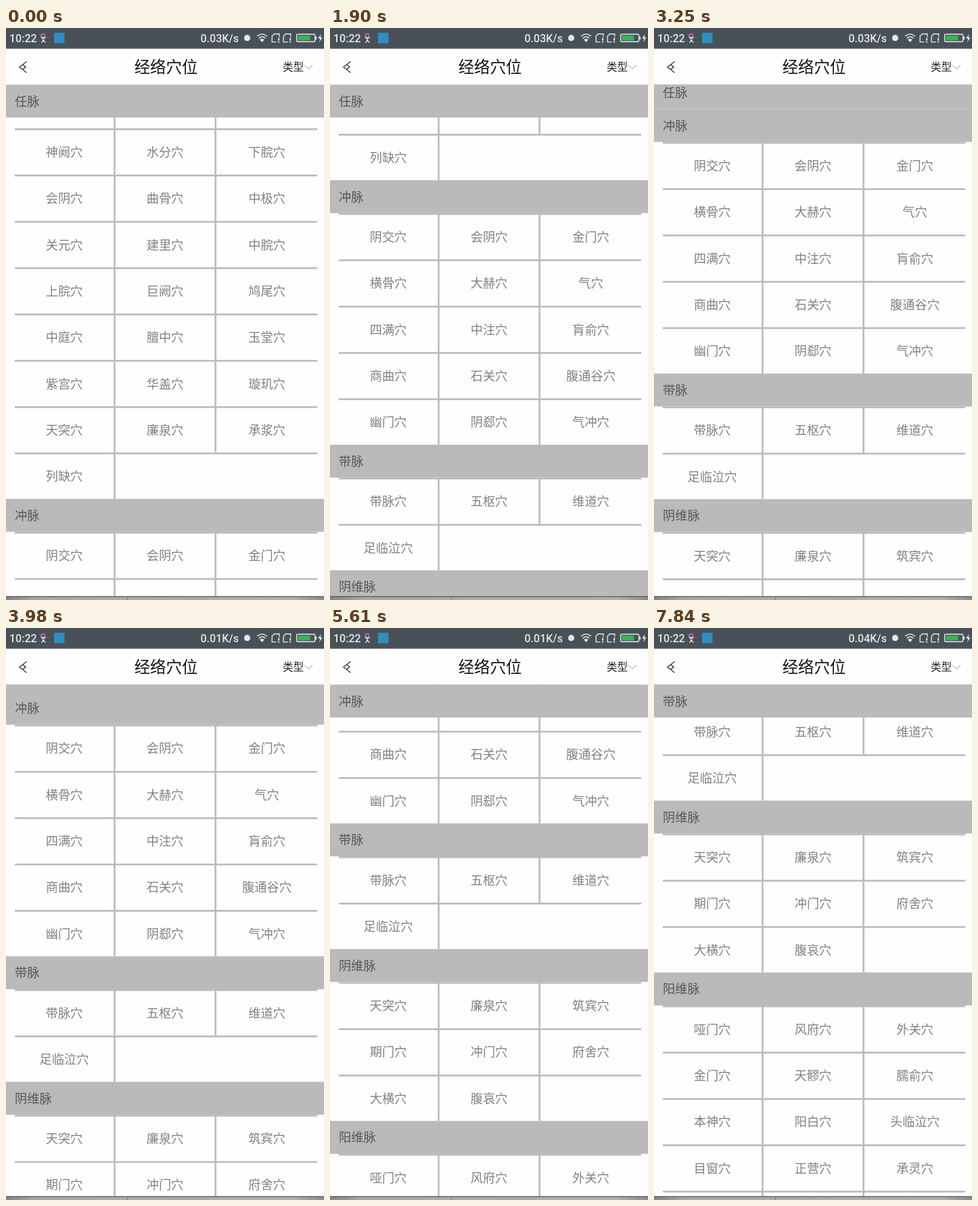
Animation, 470 px wide and 844 px high, one loop 7990 ms. Source, as an HTML page:

```html
<!DOCTYPE html>
<html lang="zh-CN">
<head>
<meta charset="utf-8">
<title>经络穴位</title>
<style>
  html, body { margin: 0; width: 100%; height: 100%; overflow: hidden; background: #fefefe; }
  svg { display: block; width: 100%; height: 100%; }
  text { font-family: "Noto Sans CJK SC", "Noto Sans CJK", sans-serif; font-weight: 300; }
  .cell { font-size: 18.2px; fill: #808080; text-anchor: middle; }
  .head { font-size: 18.2px; fill: #555; }
  .band, .rule { fill: #bababa; }
  .status { font: 500 16px Roboto, sans-serif; fill: #e3e6e8; }
  .icon { fill: none; stroke: #e3e6e8; stroke-width: 1.4; }
  .lit { fill: #e3e6e8; }
</style>
</head>
<body>
<svg viewBox="0 0 470 844" preserveAspectRatio="none">
  <defs>
    <linearGradient id="edge">
      <stop offset="0" stop-color="#858585"/>
      <stop offset=".1" stop-color="#a8a8a8"/>
      <stop offset=".9" stop-color="#b0b0b0"/>
      <stop offset="1" stop-color="#8c8c8c"/>
    </linearGradient>
  </defs>
  <rect width="470" height="844" fill="#fefefe"/>
  <g id="list"></g>
  <g id="pin">
    <rect class="band" y="83.5" width="470" height="48.6"/>
    <text class="head" id="pinName" x="13" y="114.6"></text>
  </g>

  <!-- title bar -->
  <rect y="30" width="470" height="53.2" fill="#fefefe"/>
  <path d="M30.5 49.5L20 57.5L30.5 66M24.5 53.8L29 57.6L24.5 61.5" fill="none" stroke="#444" stroke-width="1.5"/>
  <text x="236.5" y="66" font-size="23.4" fill="#111" text-anchor="middle">经络穴位</text>
  <text x="409" y="63.2" font-size="15.6" fill="#222">类型</text>
  <path d="M441 54.5L447 60.5L453 54.5" fill="none" stroke="#999"/>

  <!-- status bar -->
  <rect width="470" height="30.6" fill="#495158"/>
  <text class="status" x="5" y="21">10:22</text>
  <circle cx="54.7" cy="11.2" r="2.6" fill="none" stroke="#c56fc4" stroke-width="1.5"/>
  <path class="icon" stroke-width="1" d="M51.5 13.5L55 15.5L59 13.8M55 14V18L52.5 22M55 18L58.5 21.5"/>
  <rect x="71" y="7" width="15.5" height="15.5" fill="#2f8fc0"/>
  <text class="status" id="speed" x="287.5" y="21"></text>
  <circle class="lit" cx="356.5" cy="14.7" r="4.6"/>
  <g class="icon" stroke-width="2">
    <path d="M371 12.2Q378.5 5.6 386 12.2"/>
    <path d="M373.6 15.1Q378.5 10.8 383.4 15.1"/>
  </g>
  <path class="lit" d="M375.3 17.2Q378.5 14.8 381.7 17.2L378.5 21Z"/>
  <g id="sims"></g>
  <rect class="icon" x="429.6" y="9.3" width="27" height="11" rx="1.5"/>
  <rect x="431.5" y="11.2" width="18" height="7.2" fill="#35b558"/>
  <rect class="lit" x="457.3" y="12.5" width="1.8" height="4.6"/>
  <path class="lit" d="M465.5 9L461.3 15.6H464.2L463 21L467.6 13.7H464.8Z"/>

  <!-- bottom edge -->
  <rect y="838.6" width="470" height="5.4" fill="url(#edge)"/>
  <rect y="838.4" width="470" height="1.2" fill="#555"/>
  <rect x="179" y="839" width="1" height="5" fill="#777"/>
</svg>
<script>
const $ = id => document.getElementById(id);
const HEAD = 48.6, ROW = 68.35, LINE = 2.6, TOP = 83.5, LOOP = 7990;
const COLS = [86, 235, 385.5], SPLITS = [159.2, 308.4];

const sections = [
  ['任脉', '石门 气海 阴交 神阙 水分 下脘 会阴 曲骨 中极 关元 建里 中脘 上脘 巨阙 鸠尾 中庭 膻中 玉堂 紫宫 华盖 璇玑 天突 廉泉 承浆 列缺'],
  ['冲脉', '阴交 会阴 金门 横骨 大赫 气 四满 中注 肓俞 商曲 石关 腹通谷 幽门 阴郄 气冲'],
  ['带脉', '带脉 五枢 维道 足临泣'],
  ['阴维脉', '天突 廉泉 筑宾 期门 冲门 府舍 大横 腹哀'],
  ['阳维脉', '哑门 风府 外关 金门 天髎 臑俞 本神 阳白 头临泣 目窗 正营 承灵 脑空 风池 日月']
].map(([name, points]) => ({ name, points: points.split(' ') }));

// Section tops, measured from the top of the second section
let y = -HEAD - 9 * ROW;
for (const s of sections) {
  s.top = y;
  y += HEAD + Math.ceil(s.points.length / 3) * ROW;
}

const rect = (cls, x, y, w, h) =>
  `<rect class="${cls}" x="${x}" y="${y}" width="${w}" height="${h}"/>`;
const label = (cls, x, y, s) => `<text class="${cls}" x="${x}" y="${y}">${s}</text>`;

function drawSection({ name, points, top }) {
  let out = rect('band', 0, top, 470, HEAD) + label('head', 13, top + 31.1, name);
  points.forEach((p, i) => {
    const col = i % 3, rowTop = top + HEAD + Math.floor(i / 3) * ROW;
    if (col === 0) out += rect('rule', 13, rowTop, 447, LINE);
    if (col < 2) out += rect('rule', SPLITS[col], rowTop, LINE, ROW);
    out += label('cell', COLS[col], rowTop + 41.8, p + '穴');
  });
  return out;
}
$('list').innerHTML = sections.map(drawSection).join('');

$('sims').innerHTML = [392.5, 409.5].map(x => `<g transform="translate(${x} 8)">
  <path class="icon" d="M7 12.6H.7V4L4 .7H11.3V5"/>
  <path class="lit" d="M9.6 6.5h2v4h-2zM9.6 11.4h2v2h-2z"/></g>`).join('');

// Screen tick at given times, then scroll position at given ticks
const ticks = [[0, 0], [1450, 10], [3250, 22], [4710, 32], [6510, 44], [LOOP, 54]];
const scroll = [[0, 694.8], [4, 448.3], [10, 232], [12, 232], [13, 224.5], [22, 119.5],
  [27, 94], [32, 58.6], [39, -110], [41, -110], [44, -234], [49, -300], [53, -321]];

const segment = (keys, x) => {
  let i = 0;
  while (i < keys.length - 2 && x >= keys[i + 1][0]) i++;
  return i;
};
const slope = (keys, i) => keys[i] && keys[i + 1]
  ? (keys[i + 1][1] - keys[i][1]) / (keys[i + 1][0] - keys[i][0]) : 0;

function linear(keys, x) {
  const i = segment(keys, x);
  return keys[i][1] + slope(keys, i) * (x - keys[i][0]);
}

// Monotone cubic: harmonic mean of neighbouring slopes as tangent
function smooth(keys, x) {
  const tangent = i => {
    const a = slope(keys, i - 1), b = slope(keys, i);
    return a * b > 0 ? 2 * a * b / (a + b) : 0;
  };
  const i = segment(keys, x), [x0, y0] = keys[i], [x1, y1] = keys[i + 1];
  const h = x1 - x0, u = (x - x0) / h, v = 1 - u;
  return y0 * (1 + 2 * u) * v * v + tangent(i) * h * u * v * v
    + y1 * u * u * (3 - 2 * u) - tangent(i + 1) * h * u * u * v;
}

function render(ms) {
  const tick = Math.min(53, Math.floor(linear(ticks, ms % LOOP) + 0.02));
  const offset = smooth(scroll, tick);
  $('list').setAttribute('transform', `translate(0 ${offset.toFixed(2)})`);

  let current = 0;
  while (sections[current + 1].top + offset <= TOP) current++;
  const push = Math.min(0, sections[current + 1].top + offset - HEAD - TOP);
  $('pin').setAttribute('transform', `translate(0 ${push.toFixed(2)})`);
  $('pinName').textContent = sections[current].name;

  $('speed').textContent = (tick < 25 ? '0.03' : tick < 47 ? '0.01' : '0.04') + 'K/s';
}

const start = performance.now();
function loop() {
  render(performance.now() - start);
  requestAnimationFrame(loop);
}
loop();
</script>
</body>
</html>
```
